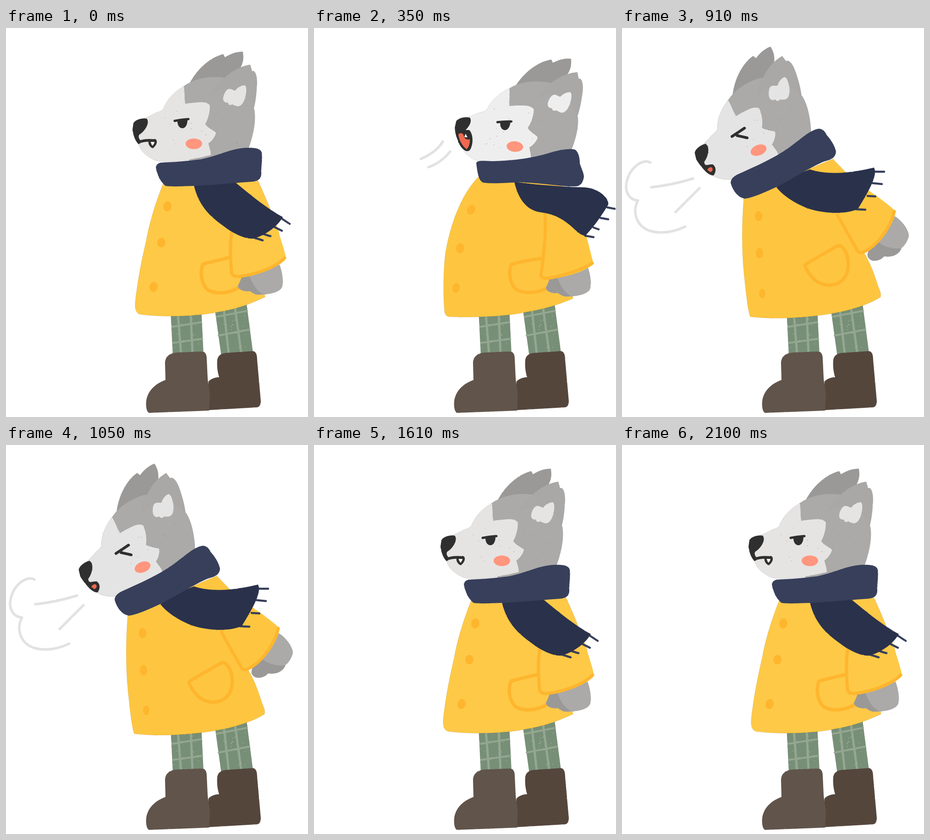
An HTML page for the animation above (2450 ms loop, 659 by 850 pixels).

```html
<!DOCTYPE html>
<html lang="en">
<head>
<meta charset="utf-8">
<title>Sneezing wolf</title>
<style>
  html, body { margin: 0; width: 100%; height: 100%; overflow: hidden; background: #fff; }
  svg { display: block; width: 100%; height: 100%; }
  .line { fill: none; stroke-linecap: round; stroke-linejoin: round; }
  .rim { stroke: #000; stroke-opacity: .3; stroke-dasharray: 1 2; }
</style>
</head>
<body>
<svg id="stage" viewBox="0 0 659 850"></svg>
<script>
const LOOP = 2450;
const C = {
  coat: '#fec640', trim: '#feb62e', scarf: '#373f5b', tail: '#2a314b', ink: '#2f2f2f',
  grey: '#abaaa9', ear: '#a9a8a7', darkGrey: '#9a9998', cheek: '#ff967d', mouth: '#f0694f',
  pants: '#778f77', plaid: '#94a790', boot: '#61544a', farBoot: '#55463c', breath: '#e2e2e2'
};

const shape = (fill, d, style = '') => `<path class="${style}" fill="${fill}" d="${d}"/>`;
const line = (stroke, width, d) => `<path class="line" stroke="${stroke}" stroke-width="${width}" d="${d}"/>`;
const oval = (fill, x, y, rx, ry, turn = 0) =>
  `<ellipse fill="${fill}" cx="${x}" cy="${y}" rx="${rx}" ry="${ry}" transform="rotate(${turn} ${x} ${y})"/>`;

let seed = 7;
const random = () => (seed = seed * 16807 % 2147483647) / 2147483647;
const specks = (count, fill, x, y, w, h) => Array.from({ length: count }, () =>
  oval(fill, x + random() * w, y + random() * h, .7, .7)).join('');

const legs =
  shape(C.pants, 'M359 615L426 610L431 712L364 716Z') +
  shape(C.pants, 'M455 610L524 595L539 710L470 718Z') +
  line(C.plaid, 5, 'M375 625L382 712M403 622L407 712M475 612L486 712M499 606L513 708') +
  line(C.plaid, 4, 'M363 653L425 643M365 688L428 679M460 631L526 618M464 672L531 659') +
  specks(14, '#c5d0c3', 366, 632, 58, 72) + specks(16, '#c5d0c3', 472, 625, 54, 80) +
  shape(C.farBoot, 'M461 725C463 715 470 711 480 710L538 706C546 706 548 715 548 725L556 815C556 825 552 829 546 829L442 835V772C448 766 458 763 465 763C461 750 460 738 461 725Z') +
  shape(C.boot, 'M347 732C348 716 358 710 375 709L425 707C434 706 438 712 438 722L440 765L445 800L443 836L312 841C306 838 305 825 306 815C309 795 322 779 348 769Z');

const headBase = face =>
  shape(C.darkGrey, 'M400 122C418 88 446 64 474 57L478 64C490 56 505 51 517 52C518 62 520 72 511 88L498 112Z') +
  shape(C.grey, 'M388 127C408 112 440 104 474 108L542 178C545 195 543 215 538 235C534 252 528 265 525 280L400 290Z') +
  shape(C.ear, 'M441 160C450 130 490 86 533 80L537 94L541 94C548 101 549 115 547 135C546 155 542 172 540 180Z') +
  oval(C.grey, 484, 182, 54, 48) +
  shape(face, 'M388 127C372 136 354 152 345 172C343 180 337 182 330 184C318 190 308 195 300 198L283 225L288 250C292 268 305 280 325 289C340 295 380 294 447 278C448 270 444 262 442 252C450 248 460 232 458 228C454 224 440 218 435 210C440 202 446 185 445 169C441 163 432 161 420 162C408 163 396 164 389 166C391 150 390 138 388 127Z', 'rim') +
  shape(face, 'M474 152C476 142 482 133 487 133C492 133 496 136 500 137C505 130 512 126 520 125C526 126 525 140 522 152C518 165 512 172 504 171C500 170 496 168 494 167C488 169 486 169 484 163C478 164 473 160 474 152Z') +
  specks(22, '#8d8c8b', 345, 175, 180, 85) +
  oval(C.cheek, 410, 253, 18, 11.5) +
  shape(C.ink, 'M278 208C282 200 298 196 307 198C311 202 310 210 306 217C301 226 294 231 291 233C288 236 290 242 293 245L290 254C284 250 278 238 276 222Z');

const sternEye =
  line(C.ink, 5, 'M368 203Q382 200 398 199') +
  shape(C.ink, 'M374 203L396 201C396 212 391 219 385 219C378 219 374 212 374 203Z');

const head = (matrix, face, extra = '') =>
  `<g transform="matrix(${matrix})">${headBase(face)}${extra}</g>`;

const loweredPaw =
  shape(C.grey, 'M529 540L597 517C602 530 606 550 603 565C598 578 575 582 556 583C545 575 535 560 529 540Z') +
  shape(C.darkGrey, 'M514 544L531 541C538 560 545 572 560 581C550 585 543 583 532 575C520 577 507 572 506 564C508 558 512 552 514 544Z');

const figure = ({ cloth = C.coat, ...p }) => legs + p.head +
  shape(cloth, p.coat, 'rim') + p.buttons + line(C.trim, 7.5, p.pocket) +
  p.paw + shape(cloth, p.sleeve) + line(C.trim, 7, p.cuff) +
  line(C.scarf, 4.5, p.fringe) + shape(C.tail, p.tail) + shape(C.scarf, p.collar) + (p.over || '');

const rest = figure({
  cloth: '#fec946',
  head: head('1 0 0 1 0 0', '#e6e4e3', sternEye +
    line(C.ink, 6, 'M290 250C298 245 314 245 325 246') +
    line(C.ink, 5, 'M313 247C313 253 316 258 320 260C325 256 328 250 326 246') +
    shape('#fff', 'M317 249H323L321 255Z')),
  coat: 'M343 340C325 385 312 430 306 465C295 510 286 560 282 600C281 615 284 624 294 626C340 632 415 631 462 621C505 614 535 602 565 588L560 540L596 448C585 415 565 365 548 330Z',
  buttons: oval(C.trim, 352, 390, 9, 11, 8) + oval(C.trim, 339, 469, 9, 10.5, 8) + oval(C.trim, 322, 566, 9, 11, 15),
  pocket: 'M486 502C470 506 445 511 430 516C422 535 427 560 440 572C460 584 490 578 506 568',
  paw: loweredPaw,
  sleeve: 'M494 440L592 436C602 470 609 490 611 502C600 520 560 538 500 545Q490 545 490 530Z',
  cuff: 'M493 445C488 470 490 510 492 533Q493 544 508 543C550 538 590 521 608 503',
  tail: 'M410 344L500 337C530 362 570 395 604 413C595 430 570 452 540 460C525 462 500 452 475 433C440 408 420 385 410 344Z',
  fringe: 'M601 416L619 428M584 434L602 443M558 449L577 455M538 457L560 464',
  collar: 'M338 294C370 293 400 290 425 287C460 280 490 264 520 262C540 261 555 262 558 272C560 285 557 300 557 315C558 330 550 335 535 336C490 339 440 344 410 345C380 346 360 347 348 345C336 335 330 320 327 305Q328 296 338 294Z'
});

const inhale = figure({
  head: head('.997 .08 -.08 .997 49.8 -26', '#efeeee', sternEye),
  coat: 'M358 326C325 360 300 420 288 485C283 510 281 580 285 620C286 628 290 631 300 631C350 633 415 631 462 621C505 614 535 604 565 591L560 540L590 440L540 340Z',
  buttons: oval(C.trim, 343, 397, 8.5, 11.5, 25) + oval(C.trim, 319, 481, 9, 11, 10) + oval(C.trim, 310, 568, 8, 11, 10),
  pocket: 'M494 504C470 507 445 512 430 517C423 535 428 560 442 572C462 582 488 578 506 570',
  paw: `<g transform="translate(0 4)">${loweredPaw}</g>`,
  sleeve: 'M504 400L593 450C600 475 606 500 610 516C590 532 550 546 505 549Q494 548 494 540C500 510 507 460 504 400Z',
  cuff: 'M504 406C508 450 498 520 495 542Q500 549 515 546C550 540 590 525 607 514',
  tail: 'M437 336C480 342 540 347 585 348C620 348 645 372 642 386C628 410 610 435 592 454C580 453 570 440 555 428C530 408 510 405 490 402C460 395 445 370 437 336Z',
  fringe: 'M640 392L656 395M625 415L642 418M610 436L621 440M592 454L610 457',
  collar: 'M354 295C358 288 370 291 390 291C440 290 480 283 510 274C535 266 560 262 570 266C578 272 580 285 580 296C584 308 589 318 589 325C587 338 582 346 570 346C540 347 510 340 450 337C420 338 390 341 370 338C360 335 357 320 354 295Z',
  over:
    shape(C.ink, 'M308 222L339 223C348 233 348 255 340 267C331 274 321 262 315 250Z') +
    shape(C.mouth, 'M315 232C321 228 325 229 327 236C329 243 335 245 340 243C341 252 337 262 333 265C324 258 316 245 315 232Z') +
    shape('#fff', 'M328 238L331 231L335 239Z') +
    line(C.breath, 5.5, 'M233 286C250 279 269 268 281 248M250 304C268 298 285 285 297 270')
});

const sneeze = figure({
  head: head('.931 -.365 .365 .931 -176 181', '#e5e4e4'),
  coat: 'M266 368C261 430 261 490 267 545C271 580 274 615 280 631C330 637 400 634 458 624C505 616 545 601 564 588C566 580 562 572 558 562C550 535 540 510 528 491L541 357L487 314L460 286Z',
  buttons: oval(C.trim, 298, 411, 8.5, 11) + oval(C.trim, 300, 492, 8, 11.5) + oval(C.trim, 306, 580, 7, 10.5),
  pocket: 'M404 514L468 477Q476 473 482 480C498 500 498 535 480 552C462 566 438 565 420 550C410 540 402 528 399 519Q400 516 404 514Z',
  paw:
    shape(C.grey, 'M555 468C575 445 590 425 595 411C610 420 626 440 626 455C622 470 612 482 605 483C590 484 570 478 555 468Z') +
    shape(C.darkGrey, 'M538 487L558 467C570 477 590 484 610 481C605 495 590 502 572 499C568 505 555 511 545 508C534 503 534 495 538 487Z'),
  sleeve: 'M468 405L517 493C550 490 585 440 597 400C580 385 560 370 541 357L510 350Z',
  cuff: 'M470 409L514 487Q518 493 526 490C560 475 588 430 594 401',
  tail: 'M337 348C360 330 385 318 410 309C450 322 500 317 550 305C557 320 546 345 515 395C490 408 440 406 405 394C375 382 350 365 337 348Z',
  fringe: 'M550 314H572M547 339L567 341M536 367L553 368M510 396L531 397',
  collar: 'M238 333Q240 327 250 321C285 305 320 290 350 271C380 253 408 222 430 220Q441 221 446 233C455 243 464 256 467 270C466 284 455 288 440 292C410 305 380 325 340 346C315 357 290 370 268 373C250 370 240 350 237 338Z',
  over:
    line(C.ink, 6, 'M267 219L240 237M251 235L273 240') +
    shape(C.ink, 'M176 296C186 303 188 297 197 298C206 302 206 314 200 322C191 323 182 314 174 304Z') +
    shape(C.mouth, 'M186 310C189 304 195 303 197 306C199 310 197 313 193 315Z') +
    line(C.breath, 5.5, 'M62 294C45 283 8 310 9 350C12 370 24 376 35 377C22 400 30 432 60 443C87 451 115 445 138 434M64 348Q110 343 155 329M117 402L169 350')
});

// A light displacement gives every edge a crayon grain.
const stage = document.getElementById('stage');
stage.innerHTML = `<filter id="grain" filterUnits="userSpaceOnUse" x="0" y="0" width="659" height="850" color-interpolation-filters="sRGB">
  <feTurbulence type="fractalNoise" baseFrequency=".5" numOctaves="2" seed="3" result="noise"/>
  <feDisplacementMap in="SourceGraphic" in2="noise" scale="2" xChannelSelector="R" yChannelSelector="G"/>
</filter>` + [rest, inhale, sneeze].map(art => `<g class="pose" filter="url(#grain)">${art}</g>`).join('');
const poses = [...stage.querySelectorAll('.pose')];

const poseAt = t => t < 350 ? 0 : t < 700 ? 1 : t < 1400 ? 2 : 0;

const start = performance.now();
function draw() {
  const current = poseAt((performance.now() - start) % LOOP);
  poses.forEach((pose, i) => pose.style.display = i === current ? '' : 'none');
  requestAnimationFrame(draw);
}
draw();
</script>
</body>
</html>
```
